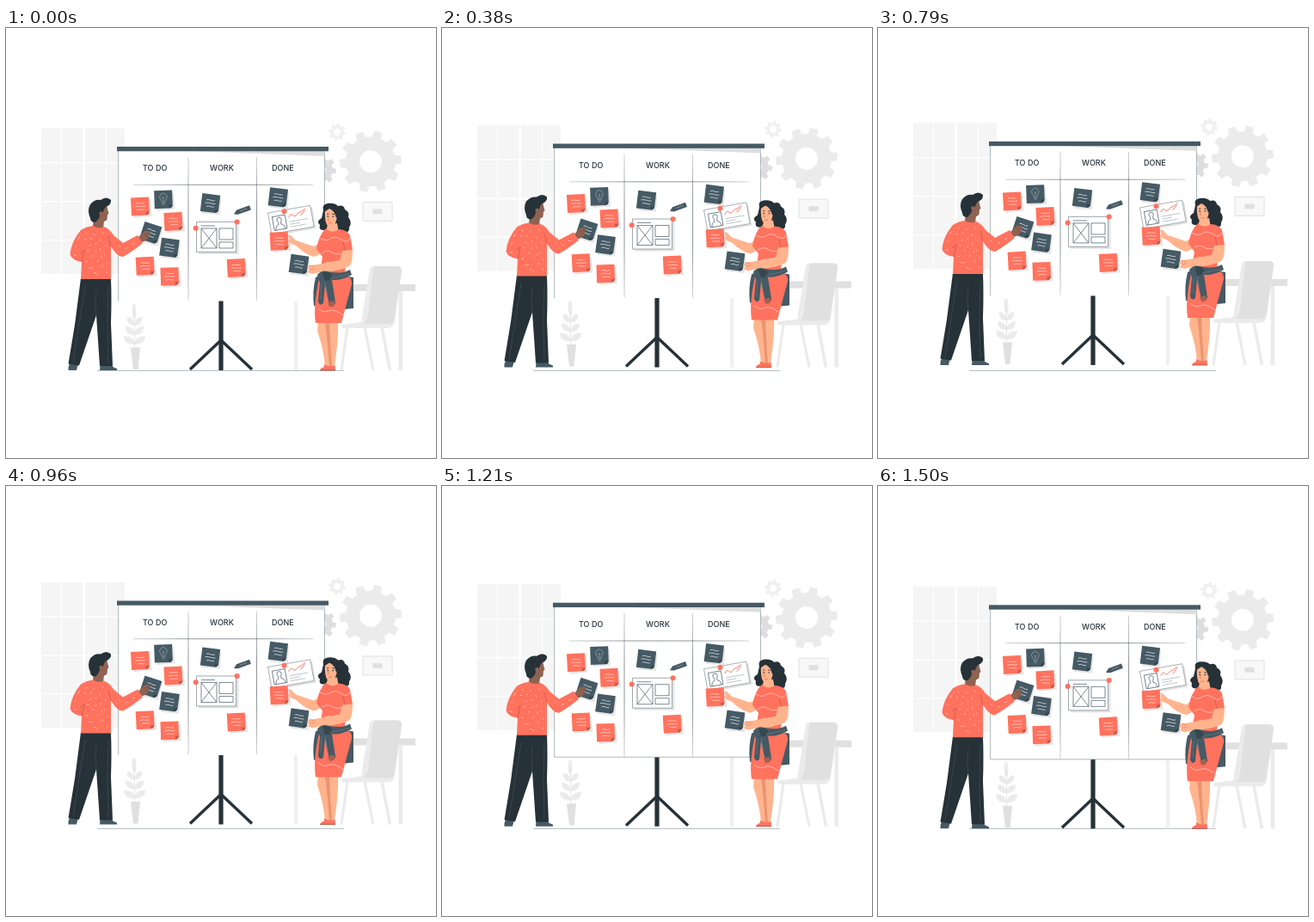
These frames come from a looping animation (500x500 px, 1.54 s). An HTML page with a canvas:

```html
<!DOCTYPE html>
<html lang="en">
<head>
<meta charset="utf-8">
<title>Task board</title>
<style>
html, body { margin: 0; width: 100%; height: 100%; overflow: hidden; background: #fff; }
canvas { display: block; width: 500px; height: 500px; }
</style>
</head>
<body>
<canvas id="stage" width="500" height="500"></canvas>
<script>
const ctx = document.getElementById('stage').getContext('2d');
const LOOP = 1540, HALF = LOOP / 2, RISE = 7, PHASE = 40;
const CORAL = '#ff725e', SLATE = '#455a64', INK = '#263238';
const SKIN = '#ffb48e', BROWN = '#8f6252';
const PALE = '#f5f5f5', LIGHT = '#ebebeb', GREY = '#e0e0e0';

function fill(path, color) {
  ctx.fillStyle = color;
  ctx.fill(new Path2D(path));
}

function line(path, color, width = 0.7) {
  ctx.strokeStyle = color;
  ctx.lineWidth = width;
  ctx.stroke(new Path2D(path));
}

function rect(x, y, w, h, color) {
  ctx.fillStyle = color;
  ctx.fillRect(x, y, w, h);
}

function dot(x, y, r, color) {
  ctx.fillStyle = color;
  ctx.beginPath();
  ctx.arc(x, y, r, 0, Math.PI * 2);
  ctx.fill();
}

function placed(x, y, degrees, draw) {
  ctx.save();
  ctx.translate(x, y);
  ctx.rotate(degrees * Math.PI / 180);
  draw();
  ctx.restore();
}

function gear(x, y, outer, root, hole, teeth, start, color) {
  placed(x, y, start, () => {
    const step = Math.PI * 2 / teeth;
    ctx.beginPath();
    for (let i = 0; i < teeth; i++) {
      const a = i * step;
      [[-0.3, root], [-0.2, outer], [0.2, outer], [0.3, root]].forEach(([k, r]) =>
        ctx.lineTo(r * Math.cos(a + k * step), r * Math.sin(a + k * step)));
    }
    ctx.closePath();
    ctx.moveTo(hole, 0);
    ctx.arc(0, 0, hole, 0, Math.PI * 2);
    ctx.fillStyle = color;
    ctx.fill('evenodd');
  });
}

// A stroke that fades out towards both ends.
function taper(x1, y1, x2, y2) {
  const g = ctx.createLinearGradient(x1, y1, x2, y2);
  g.addColorStop(0, 'rgba(38,50,56,.3)');
  g.addColorStop(0.35, 'rgba(38,50,56,.75)');
  g.addColorStop(0.65, 'rgba(38,50,56,.75)');
  g.addColorStop(1, 'rgba(38,50,56,.3)');
  line(`M${x1} ${y1}L${x2} ${y2}`, g, 0.7);
}

function note(x, y, degrees, color, bulb) {
  placed(x, y, degrees, () => {
    fill('M-9-8L12-7 13 12-8 13Z', '#e6e6e6');
    fill('M-10.5-10.5H10.5V7Q10 10 7 10.5H-10.5Z', color);
    fill('M10.5 6Q8 7 6 6.5 7 9 5.5 10.5 10 10.5 10.5 6Z', 'rgba(0,0,0,.22)');
    if (bulb) {
      line('M-1.7 4Q-1.5 2-3.3 0A4.3 4.3 0 1 1 3.3 0Q1.5 2 1.7 4ZM-1.5 6H1.5M0 3V-1L-1.5-3M0-1L1.5-3', '#a9b5bb', 0.6);
    } else {
      const ink = color === CORAL ? '#ffd0c8' : '#d5dcdf';
      line('M-5-3.5Q-2-4.5 0-3.6T5-3.8M-6 .2Q-2-.8 1 0T6-.2M-4 4Q-1 3 1 3.8T5 3.6', ink, 0.8);
    }
  });
}

function room() {
  rect(41, 116.5, 97, 169.5, PALE);
  [[64, 1], [89.5, 2.4], [116, 1]].forEach(([x, w]) => rect(x, 116, w, 170, '#fff'));
  [[156.2, 1.2], [201, 1.6], [246, 1.2]].forEach(([y, h]) => rect(41, y, 97, h, '#fff'));

  gear(385, 121.2, 10, 7.8, 4, 8, 10, '#f0f0f0');
  gear(424, 155.3, 36, 29, 13, 10, -4, LIGHT);
  gear(367, 165, 17, 13, 5, 8, 5, '#dedede');

  rect(415, 202.5, 34, 22, '#f7f8f7');
  line('M415 202.5H449V224.5H415Z', '#dde1e0', 0.9);
  rect(426.5, 210.5, 11, 6, GREY);

  rect(335, 306, 4, 92, '#f0f0f0');
  rect(456.5, 306, 4.5, 92, LIGHT);
  rect(372, 298, 104, 8, GREY);

  line('M397 348L390 398M417 348L427 398', LIGHT, 3.2);
  line('M437 348L446.5 398', LIGHT, 3.6);
  fill('M423 280Q424 277 428 277H455Q460.5 277 460 283L452 341Q451 349 443 349H392Q389 348 390 345L413 342Z', LIGHT);
  fill('M429 277H455Q460.5 277 460 283L451 341Q450 344 444 344H415Q420 341 421 334L427 281Q427 278 429 277Z', GREY);

  fill('M147 323Q148 319 150.5 321.5 153 333 149.5 339 145 333 147 323Z', LIGHT);
  [336, 347, 358].forEach((y, i) => {
    const s = 9 + i * 1.7;
    fill(`M149.5 ${y + 10}Q${149.5 - s} ${y + 10} ${149.5 - s} ${y}Q149 ${y} 149.5 ${y + 10}Q150 ${y} ${149.5 + s} ${y}Q${149.5 + s} ${y + 10} 149.5 ${y + 10}Z`, LIGHT);
  });
  line('M149.5 330V372', GREY, 0.8);
  fill('M145 371.5H156L153.5 397H148Z', GREY);
}

function wireframe() {
  rect(224, 228, 46.5, 35, '#e4e4e4');
  rect(221.5, 225.5, 46, 35, '#fff');
  line('M221.5 225.5H267.5V260.5H221.5Z', '#78858b');
  line('M227 230H243M227 233H245V256H227ZL245 256M245 233L227 256M248 233H264V246H248ZM248 249H264V256H248Z', SLATE);
  dot(220.7, 232.7, 3, CORAL);
  dot(268.6, 225.6, 3, CORAL);
}

function card() {
  placed(331.3, 223, -10, () => {
    rect(-23, -10, 50, 25, '#e2e2e2');
    rect(-25, -12.5, 50, 25, '#fff');
    line('M-25-12.5H25V12.5H-25Z', '#8b979c', 0.7);
    line('M-21-7H-6V9H-21ZM-19 9Q-19 4-15 3V1Q-18-5-13.5-5-9-5-12 1V3Q-8 4-8 9', SLATE, 0.7);
    line('M-2 2H20M-2 5H10M-2 8H16', '#9aa5a9', 0.6);
    line('M-2-3Q1-8 3-5T8-5 13-7L19-10M12-3L18-8', CORAL, 0.9);
  });
  dot(323.5, 213.3, 3, CORAL);
}

function board(showEdge) {
  line('M250 363L214 397M250 363L286 397', INK, 3.4);
  rect(247.4, 317, 5.2, 81, INK);
  rect(130.7, 143, 240, 174.5, '#fff');
  line('M130.7 143V317.5M370.5 143V317.5', '#8d989d', 0.7);
  if (showEdge) line('M130.7 317.5H370.5', '#8d989d', 0.7);
  fill('M212 143H370.5V149Z', '#dedede');
  rect(129, 138, 246, 5.3, SLATE);
  taper(148, 182.3, 357, 182.3);
  taper(212, 150, 212.01, 317);
  taper(291.5, 150, 291.51, 317);

  ctx.fillStyle = INK;
  ctx.font = '500 9px Inter, sans-serif';
  ctx.fillText('TO DO', 159, 166.3);
  ctx.fillText('WORK', 237, 166.3);
  ctx.fillText('DONE', 309, 166.3);

  note(156, 207.5, -3, CORAL);
  note(183, 199.3, -2, SLATE, true);
  note(194.5, 225, -3, CORAL);
  note(168.2, 238.3, 18, SLATE);
  note(190, 255.5, 8, SLATE);
  note(161.7, 276.7, -3, CORAL);
  note(190.3, 289, -2, CORAL);
  note(237.5, 203.8, 7, SLATE);
  note(267.8, 279, -3, CORAL);
  note(316.3, 197, 7, SLATE);
  note(340.5, 274.7, 8, SLATE);
  placed(274.5, 212, -20, () => {
    fill('M-10.5 1L-6-2.5H10V3H-6Z', SLATE);
    line('M-3 0H6', '#9aa8ae', 0.6);
  });
  wireframe();
  card();
  note(317.7, 247.8, -3, CORAL);
}

function man() {
  fill('M74 390H84L82 398H72.5Q72 394 74 390Z', SLATE);
  fill('M109.5 392H122Q125 395 129 396V398H109Z', SLATE);
  fill('M87 291H122Q123 315 122 343L124 393H109L105 334 85 392.5 72.5 390.5 80 345Z', INK);
  line('M105 305Q103 320 105 334M119 300Q117 345 119 390M92 300L78 389', '#455058', 0.6);

  fill('M102 217L115 216 113 233 108 236 101 232Z', BROWN);
  fill('M109 205H117Q118 211 119.5 216L118 217 117.5 223Q115 226 109 225Z', BROWN);
  fill('M98 205Q103 199 110 200 117 195 122 200 123 205 116 208 114 210 113 214L109 215Q110 221 104 226 98 226 98 221 94 212 98 205Z', INK);
  dot(110.5, 215.5, 2.2, BROWN);

  // Reaching hand, then the jumper over the wrist.
  fill('M154 243L161 236 167 236 168 239 165 240 167 243 161 248 156 249Z', BROWN);
  line('M161 240L167 238M162 243L167 241', '#754c3f', 0.6);
  fill('M101 230Q108 234 114 231 121 234 125 241L136 250 153 241 159 250Q147 260 136 266 130 267 122 254L122 292H87L88 272Q76 270 74.5 263 76 248 87 235 93 231 101 230Z', CORAL);
  line('M88 272L91 258 86 262M122 254L119 242', '#c95444', 0.7);
  ctx.strokeStyle = '#ffd3c9';
  ctx.lineWidth = 0.7;
  for (let i = 0; i < 24; i++) {
    const x = 92 + (i * 11) % 27, y = 239 + Math.floor(i / 3) * 6.6, a = i * 1.9;
    ctx.beginPath();
    ctx.moveTo(x, y);
    ctx.lineTo(x + 2.4 * Math.cos(a), y + 2.4 * Math.sin(a));
    ctx.stroke();
  }
  line('M80 255L82 253M79 264L82 265M84 246L85 243M131 253L133 255M139 257L142 255M147 251L150 251', '#ffd3c9');
}

function woman() {
  // Hair behind the face.
  fill('M369 212Q367 205 374 204 382 203 386 207 393 205 394 211 400 214 398 220 403 226 399 232 400 239 392 237 386 240 382 234L371 235Q363 236 365 229 360 225 367 221Z', INK);
  fill('M360 290L371 284 404 290V326L394 327 358 323Q356 306 360 290Z', SLATE);

  fill('M363 340H386Q387 360 382 393L371 394Q370 376 362 352Z', SKIN);
  fill('M371 342H376Q377 370 379 394H376Q374 364 371 342Z', '#ec9370');
  fill('M370 391Q377 395 382.5 392L383 398H365Q366 395 370 394Z', CORAL);
  line('M365 398H383', '#a94435', 0.8);

  fill('M374 229L385 227 387 238 378 241 372 236Z', SKIN);
  fill('M371 210Q378 207 384 211 386 220 383 227 379 233 374 230 370 226 371 210Z', SKIN);
  fill('M370 214Q369 206 376 206 386 206 387 219L384 221Q382 212 376 210Z', INK);
  line('M373 216.5L375.5 216M379 216L382 217', INK, 0.8);
  dot(374.2, 219, 0.8, INK);
  dot(380.2, 219.2, 0.8, INK);
  line('M375.5 219L374.2 223.3 376 223.5', '#d97a58', 0.7);
  line('M375 226.5Q377 228 379 226.3', CORAL, 1);

  fill('M363 251L358 254 337 247 331 241 328.5 241 330 246 328 248 332 251 337 253Q347 263 358 266 366 264 367 259Z', SKIN);
  fill('M372 233Q379 240 387 234 397 235 400 241L403 258 396 261 394 287Q403 290 402 298L390 343H360Q357 324 364 292L368 266 361 257Q364 240 372 233Z', CORAL);
  line('M365 244Q371 249 377 245T390 246 400 244M367 262Q373 257 379 261T394 261M363 326Q369 332 375 329T392 334M369 275Q374 270 379 274T393 274', '#ffc5bb', 0.8);
  line('M392 249L394 258 394 268', '#c95444', 0.7);

  // Bent arm resting on the lower card.
  fill('M391 259L403 258Q403 274 399 277 388 283 365 284L356 286 351 284 353 281 350 279 353 276 362 275 388 270Z', SKIN);
  line('M353 281L359 280M353 276L359 278', '#df825f', 0.6);

  // Jacket tied around the waist.
  fill('M362 287Q367 281 374 283 390 287 400 281L402 287Q390 294 379 293L383 319Q381 326 376 322L371 298 369 320Q365 324 363 318L365 296Z', SLATE);
  fill('M368 284Q375 282 379 287 378 294 371 294Z', '#37474f');
  line('M371 294L374 314M377 291L400 286M367 296L366 315', '#6d7f87', 0.6);
  fill('M374 319L381 317 382 321Q380 325 376 324Z', '#a6604f');
}

function lift(t) {
  const phase = (t + PHASE) % LOOP;
  const travelled = 1 - Math.abs(phase - HALF) / HALF;
  return RISE * (PHASE / HALF - travelled);
}

function frame(now) {
  const t = now % LOOP;
  rect(0, 0, 500, 500, '#fff');
  line('M106 398.5H393', '#9ca5a9', 0.7);
  ctx.save();
  ctx.translate(0, lift(t));
  room();
  board(t >= 1100);
  man();
  woman();
  ctx.restore();
}

const start = performance.now();
function tick() {
  frame(performance.now() - start);
  requestAnimationFrame(tick);
}
tick();
</script>
</body>
</html>
```
